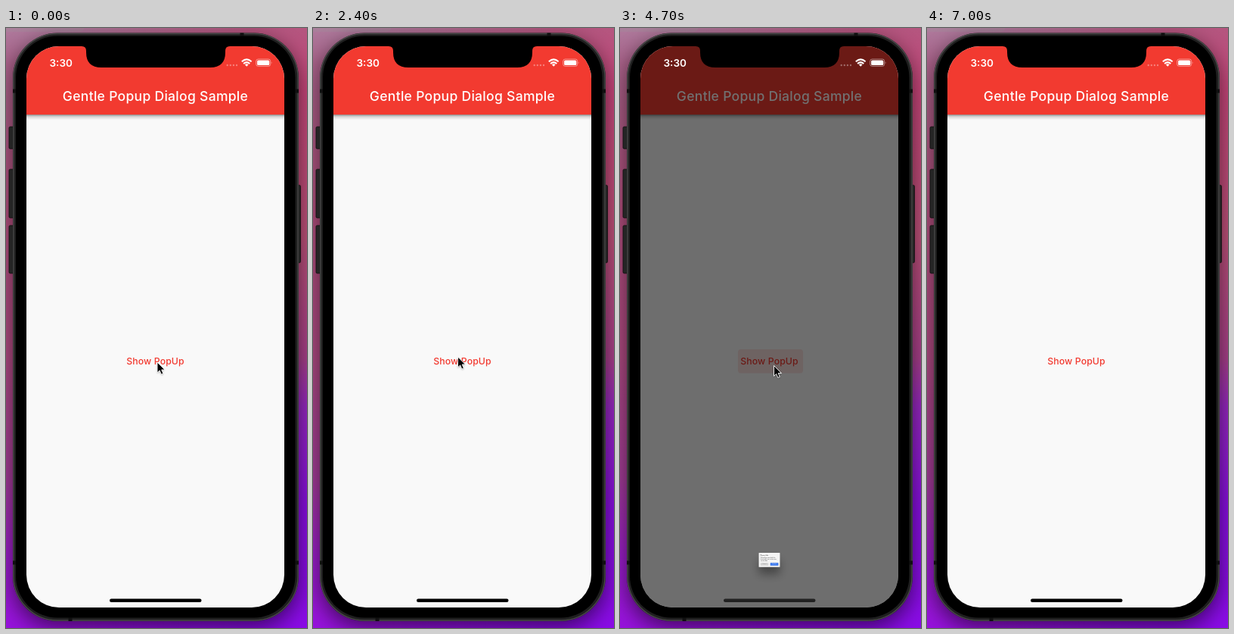
An HTML page that plays this animation: 398x790 px, repeating every 7.1 s.

```html
<!DOCTYPE html>
<html lang="en">
<head>
<meta charset="utf-8">
<title>Dialog demo</title>
<style>
  html, body { margin: 0; width: 100%; height: 100%; overflow: hidden; background: #702050; }
  svg { display: block; width: 398px; height: 790px; }
  text { font-family: Inter, Roboto, sans-serif; }
  .m { text-anchor: middle; }
  .med { font-weight: 500; }
</style>
</head>
<body>
<svg viewBox="0 0 398 790">
  <defs>
    <linearGradient id="left" x1="0" y1="0" x2="0" y2="1">
      <stop offset="0" stop-color="#ae7a9c"/>
      <stop offset=".06" stop-color="#aa628a"/>
      <stop offset=".3" stop-color="#b04e7c"/>
      <stop offset=".55" stop-color="#ae4a82"/>
      <stop offset=".75" stop-color="#a43c98"/>
      <stop offset=".88" stop-color="#9c1ecb"/>
      <stop offset="1" stop-color="#9612dc"/>
    </linearGradient>
    <linearGradient id="right" x1="0" y1="0" x2="0" y2="1">
      <stop offset="0" stop-color="#b4567f"/>
      <stop offset=".1" stop-color="#c6467a"/>
      <stop offset=".35" stop-color="#ba5078"/>
      <stop offset=".55" stop-color="#a8408a"/>
      <stop offset=".63" stop-color="#9628c0"/>
      <stop offset=".8" stop-color="#880fe0"/>
      <stop offset="1" stop-color="#8a0ce6"/>
    </linearGradient>
    <linearGradient id="fade">
      <stop offset=".2" stop-color="#fff" stop-opacity="0"/>
      <stop offset=".8" stop-color="#fff"/>
    </linearGradient>
    <linearGradient id="barShade" x1="0" y1="0" x2="0" y2="1">
      <stop offset="0" stop-color="#000" stop-opacity=".42"/>
      <stop offset=".4" stop-color="#000" stop-opacity=".14"/>
      <stop offset="1" stop-color="#000" stop-opacity="0"/>
    </linearGradient>
    <mask id="mix"><rect width="398" height="790" fill="url(#fade)"/></mask>
    <clipPath id="screen"><rect x="27" y="24" width="341" height="739" rx="43"/></clipPath>
    <filter id="soft" filterUnits="userSpaceOnUse" x="0" y="200" width="398" height="590">
      <feGaussianBlur id="blur" stdDeviation="12"/>
    </filter>
    <filter id="bodyShade" filterUnits="userSpaceOnUse" x="-60" y="-60" width="520" height="920">
      <feGaussianBlur stdDeviation="14"/>
    </filter>
    <filter id="tipShade" x="-50%" y="-50%" width="200%" height="200%">
      <feGaussianBlur stdDeviation=".9"/>
    </filter>
  </defs>

  <rect width="398" height="790" fill="url(#left)"/>
  <rect width="398" height="790" fill="url(#right)" mask="url(#mix)"/>
  <path d="M0 0H104Q102 5 96 5H0Z" fill="#a08a9a" opacity=".4"/>
  <rect x="9" y="15" width="378" height="775" rx="59" opacity=".55" filter="url(#bodyShade)"/>

  <!-- phone body -->
  <g fill="#252525" stroke="#0e0e0e" stroke-width=".8">
    <rect x="4" y="130" width="8" height="29" rx="1.5"/>
    <rect x="4" y="186" width="8" height="64" rx="1.5"/>
    <rect x="4" y="260" width="8" height="63" rx="1.5"/>
    <rect x="383" y="207" width="6.5" height="102" rx="1.5"/>
  </g>
  <rect x="9" y="6.500" width="378" height="774.500" rx="59" fill="#1f1f1f"/>
  <rect x="10" y="7.500" width="376" height="772.500" rx="58" fill="none" stroke="#484848" stroke-width="1.4"/>
  <path d="M9 83h4M382.500 83h4.500M9 704h4M382.500 704h4.500M85 776.500v4.500M312 6.500v4" stroke="#101010" stroke-width="5"/>
  <rect x="13" y="10.500" width="369.500" height="766" rx="55"/>

  <g clip-path="url(#screen)">
    <rect x="27" y="24" width="341" height="739" fill="#f9f9f9"/>
    <rect x="27" y="114" width="341" height="7" fill="url(#barShade)"/>
    <rect x="27" y="24" width="341" height="90" fill="#f23a30"/>
    <text class="m med" x="197.5" y="96" font-size="17.5" letter-spacing=".3" fill="#fff">Gentle Popup Dialog Sample</text>
    <rect id="ripple" x="156" y="423" width="86" height="31.500" rx="4" fill="#f23a30"/>
    <text class="m med" x="197.5" y="442.8" font-size="12.25" letter-spacing=".1" fill="#f23a30">Show PopUp</text>
    <rect id="dim" x="27" y="24" width="341" height="739"/>
    <g id="popup">
      <rect id="shade" rx="3" filter="url(#soft)" fill-opacity=".38"/>
      <g id="card">
        <rect x="62" y="307.700" width="271" height="182.800" rx="3.500" fill="#fff"/>
        <text class="med" x="83" y="345.3" font-size="17.5" letter-spacing=".1" fill="#222">Privacy Info</text>
        <g font-size="14" fill="#222">
          <text x="83" y="380.600">The backup created with this</text>
          <text x="83" y="397.200">functionality may contain some</text>
          <text x="83" y="413.800">sensitive data.</text>
        </g>
        <rect x="83" y="436.300" width="102.300" height="33.500" rx="3" fill="#dcdcdc"/>
        <rect id="press" x="83" y="436.300" width="102.300" height="33.500" rx="3" fill="#000"/>
        <rect x="209.800" y="437" width="102.300" height="33.500" rx="3" opacity=".3" filter="url(#tipShade)"/>
        <rect x="209.800" y="436.300" width="102.300" height="33.500" rx="3" fill="#3a7dfe"/>
        <text class="m" x="134" y="458" font-size="14" fill="#868686">Cancel</text>
        <text class="m" x="260.800" y="458" font-size="14" fill="#fff">Confirm</text>
      </g>
    </g>
    <rect id="home" x="137" y="751.500" width="121.500" height="4.600" rx="2.300"/>
  </g>

  <path d="M100 23V24Q106 24 106 30V32Q106 52 126 52H270Q290 52 290 32V30Q290 24 296 24V23Z"/>

  <!-- status bar -->
  <text x="57.500" y="50.500" font-size="13.500" font-weight="600" fill="#fff">3:30</text>
  <g fill="#fff" fill-opacity=".35">
    <circle cx="292.700" cy="49" r="1.200"/><circle cx="296.800" cy="49" r="1.200"/>
    <circle cx="300.900" cy="49" r="1.200"/><circle cx="305" cy="49" r="1.200"/>
  </g>
  <g fill="none" stroke="#fff" stroke-width="2">
    <path d="M311.800 44.300Q318.200 38.500 324.600 44.300M314.100 47Q318.200 43.200 322.300 47"/>
  </g>
  <path d="M315.900 48.300Q318.200 46.400 320.500 48.300L318.200 50.800Z" fill="#fff"/>
  <rect x="330.700" y="41" width="19" height="9.400" rx="2.800" fill="none" stroke="#fff" stroke-opacity=".5" stroke-width=".9"/>
  <rect x="332.100" y="42.400" width="16.200" height="6.600" rx="1.600" fill="#fff"/>
  <path d="M350.800 44.200q1.400 1.500 0 3z" fill="#fff" fill-opacity=".6"/>

  <g id="cursor">
    <path d="M0 1V15L3.300 12L5.500 17L8 16L5.800 11H10Z" opacity=".35" filter="url(#tipShade)"/>
    <path d="M0 0V13.800L3.200 10.900L5.300 15.900L7.800 14.900L5.700 10H10Z" stroke="#fff" stroke-width=".9"/>
  </g>
</svg>

<script>
const LOOP = 7100, STEP = 100;
const GROW = 1000, FADE = 150;
const ANCHOR_Y = 735, MID_X = 197.5;

// open / cancel pressed / close, in ms
const rounds = [
  { open: 118, press: 1850, close: 2060 },
  { open: 2615, press: 3900, close: 4120 },
  { open: 4597, press: 6250, close: 6460 }
];

// time, x, y of the pointer tip
const path = [
  [0, 200, 440], [1320, 200, 440], [1600, 147, 446], [2080, 147, 446],
  [2400, 191.5, 433], [3600, 191.5, 433], [3950, 159.5, 451], [4130, 159.5, 451],
  [4400, 203.5, 444.5], [5640, 203.5, 444.5], [6000, 143.5, 461],
  [6450, 143.5, 461], [6700, 168, 482], [6850, 168, 482], [7000, 168, 800]
];

const $ = id => document.getElementById(id);
const clamp = v => Math.max(0, Math.min(1, v));
const easeOut = p => 1 - (1 - p) ** 2.3;
const smooth = p => p * p * (3 - 2 * p);

function set(id, attrs) {
  for (const key in attrs) $(id).setAttribute(key, attrs[key]);
}

function pointer(t) {
  let i = 0;
  while (i < path.length - 2 && t >= path[i + 1][0]) i++;
  const a = path[i], b = path[i + 1];
  const p = smooth(clamp((t - a[0]) / (b[0] - a[0])));
  return [a[1] + (b[1] - a[1]) * p, a[2] + (b[2] - a[2]) * p];
}

function draw(t) {
  const r = rounds.filter(q => t >= q.open - 50).pop() || rounds[0];
  const since = t - r.open;
  const shown = easeOut(clamp(since / FADE)) * (1 - easeOut(clamp((t - r.close) / FADE)));
  const scale = clamp(since / GROW);
  const top = ANCHOR_Y + (307.7 - ANCHOR_Y) * scale;

  set("ripple", { opacity: since < -50 ? 0 : 0.13 * (1 - clamp((since - 110) / 200)) });
  set("dim", { opacity: 0.6 * shown });
  set("home", { fill: `rgb(${[0, 0, 0].map(() => Math.round(36 * shown))})` });
  set("popup", { opacity: shown, display: scale > 0 && shown > 0 ? "inline" : "none" });
  set("card", {
    transform: `translate(${MID_X} ${ANCHOR_Y}) scale(${scale}) translate(${-MID_X} ${-ANCHOR_Y})`
  });
  set("shade", {
    x: MID_X - 135.5 * scale, y: top + 9 + 5 * scale,
    width: 271 * scale, height: 182.8 * scale
  });
  set("blur", { stdDeviation: 5 + 8 * scale });
  set("press", { opacity: 0.035 * clamp((t - r.press) / 100) });

  const [x, y] = pointer(t);
  set("cursor", { transform: `translate(${x} ${y})`, display: t >= 7000 ? "none" : "inline" });
}

const start = performance.now();
function tick() {
  const t = (performance.now() - start) % LOOP;
  draw(Math.floor(t / STEP) * STEP);
  requestAnimationFrame(tick);
}
draw(0);
tick();
</script>
</body>
</html>
```
